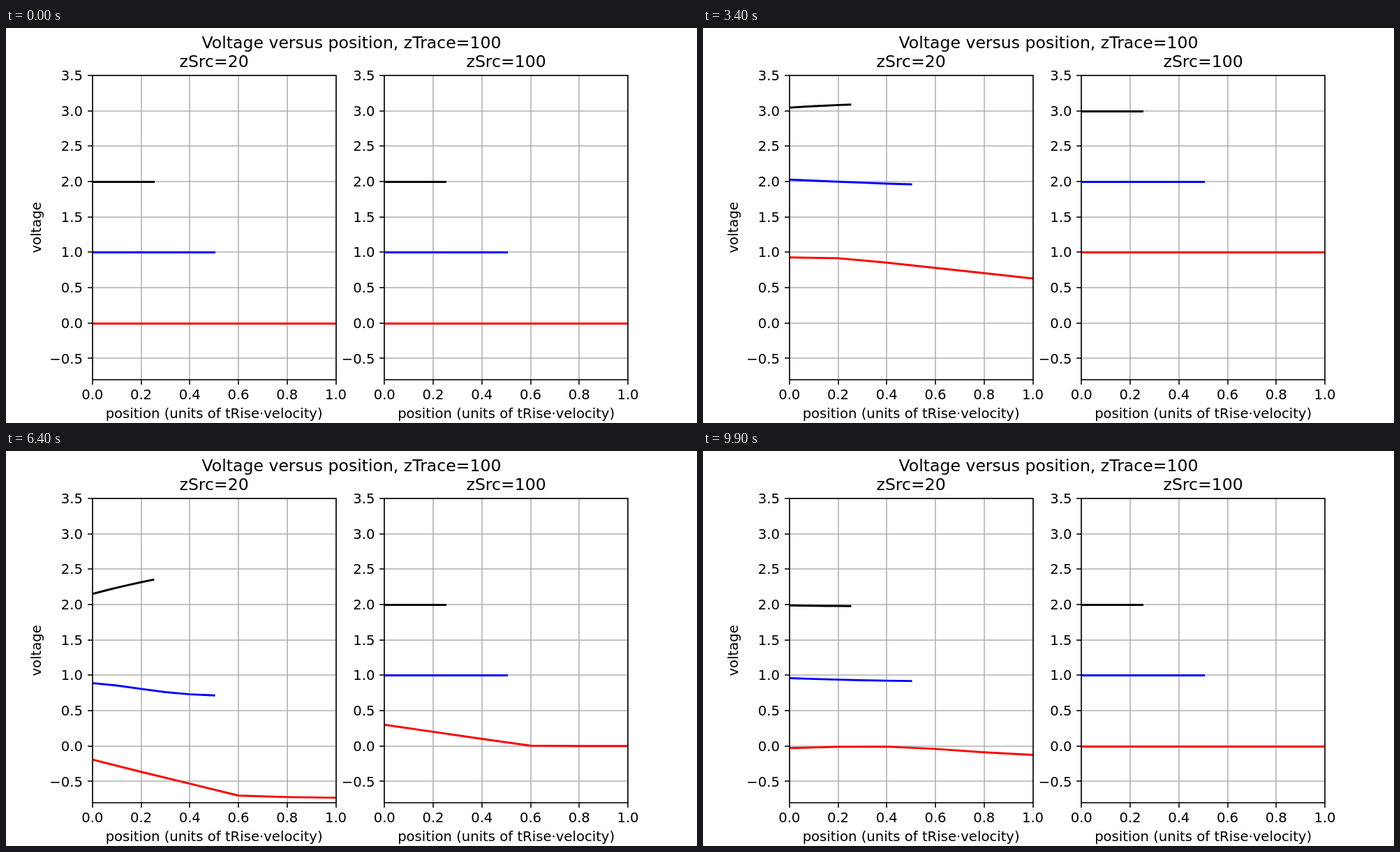
Animation of 990x566 px, one loop 10 s. Source, as an HTML page with a canvas:

```html
<!DOCTYPE html>
<html lang="en">
<head>
<meta charset="utf-8">
<title>Voltage versus position</title>
<style>
html, body { margin: 0; width: 100%; height: 100%; overflow: hidden; background: #fff; }
canvas { display: block; }
</style>
</head>
<body>
<canvas id="stage" width="990" height="566"></canvas>
<script>
const ctx = document.getElementById('stage').getContext('2d');
const PT = 990 / 7 / 72;
const W = 348.75, H = 435.82, TOP = 67.92, BOTTOM = TOP + H;
const SMALL = 10 * PT, LARGE = 12 * PT, TICK = 3.5 * PT;
const Z_TRACE = 100, LEAD = 0.2, STEP = 0.2, PULSE = 10;
const panels = [{ left: 123.75, zSrc: 20 }, { left: 542.25, zSrc: 100 }];
const traces = [
  { len: 1, offset: 0, color: '#f00', spread: 0.02 },
  { len: 0.5, offset: 1, color: '#00f', spread: 0.055 },
  { len: 0.25, offset: 2, color: '#000', spread: 0.08 }
];

const yOf = v => TOP + (3.5 - v) * H / 4.3;
const snap = v => Math.floor(v + 0.5);

// Unit ramp averaged over a window of half width w.
function ramp(u, w) {
  const q = a => a > 0 ? a * a / 2 : 0;
  return (q(u + w) - q(u - w) - q(u - 1 + w) + q(u - 1 - w)) / (2 * w);
}

// Sum of all bounces on a line with an open far end and a short lead at both ends.
function voltage(x, t, { len, spread }, zSrc) {
  const gain = Z_TRACE / (Z_TRACE + zSrc);
  const reflect = (zSrc - Z_TRACE) / (zSrc + Z_TRACE);
  const trip = 2 * (len + 2 * LEAD);
  const back = trip - 2 * LEAD - x;
  const wave = delay => {
    const w = Math.max(0.001, spread * delay);
    return ramp(t - delay, w) - ramp(t - PULSE - delay, w);
  };
  let sum = 0, weight = gain;
  for (let d = 0; d < t + 2 && weight; d += trip, weight *= reflect)
    sum += weight * (wave(d + x) + wave(d + back));
  return sum;
}

function line(x1, y1, x2, y2) {
  ctx.beginPath();
  ctx.moveTo(x1, y1);
  ctx.lineTo(x2, y2);
  ctx.stroke();
}

function label(text, x, y, size = SMALL, align = 'center') {
  ctx.font = `${size}px "DejaVu Sans", sans-serif`;
  ctx.textAlign = align;
  ctx.fillText(text, x, y);
}

function drawTrace(trace, { left, zSrc }, t) {
  let pts = [0, 1, 2, 3, 4, 5].map(i => {
    const x = trace.len * i / 5;
    return [left + x * W, yOf(trace.offset + voltage(x, t, trace, zSrc))];
  });
  // Flat lines sit on whole pixels.
  if (pts.every(p => Math.abs(p[1] - pts[0][1]) < 0.05))
    pts = pts.map(p => p.map(v => snap(v) + 0.5));
  ctx.strokeStyle = trace.color;
  ctx.beginPath();
  pts.forEach(p => ctx.lineTo(...p));
  ctx.stroke();
}

function drawPanel(panel, t) {
  const { left, zSrc } = panel;
  const x0 = snap(left), x1 = snap(left + W), y0 = snap(TOP), y1 = snap(BOTTOM);
  const xTicks = [0, 0.2, 0.4, 0.6, 0.8, 1];
  const yTicks = [-0.5, 0, 0.5, 1, 1.5, 2, 2.5, 3, 3.5];

  ctx.lineWidth = 0.8 * PT;
  ctx.lineCap = 'butt';
  for (const v of xTicks) {
    const x = snap(left + v * W);
    ctx.strokeStyle = '#b0b0b0';
    line(x, y0, x, y1);
    ctx.strokeStyle = '#000';
    line(x, y1, x, y1 + TICK);
    label(v.toFixed(1), left + v * W, BOTTOM + 2 * TICK + 0.76 * SMALL);
  }
  for (const v of yTicks) {
    const y = snap(yOf(v));
    ctx.strokeStyle = '#b0b0b0';
    line(x0, y, x1, y);
    ctx.strokeStyle = '#000';
    line(x0 - TICK, y, x0, y);
    label(v.toFixed(1).replace('-', '\u2212'), left - 2 * TICK, yOf(v) + 0.365 * SMALL, SMALL, 'right');
  }

  ctx.save();
  ctx.beginPath();
  ctx.rect(x0, y0, x1 - x0, y1 - y0);
  ctx.clip();
  ctx.lineWidth = 1.5 * PT;
  ctx.lineCap = 'square';
  ctx.lineJoin = 'round';
  for (const trace of traces) drawTrace(trace, panel, t);
  ctx.restore();

  ctx.strokeStyle = '#000';
  ctx.strokeRect(x0, y0, x1 - x0, y1 - y0);
  label(`zSrc=${zSrc}`, left + W / 2, TOP - 6 * PT, LARGE);
  label('position (units of tRise\u22c5velocity)', left + W / 2, 559.2);
}

function draw(now) {
  const frame = Math.floor(now / 100) % 100;
  ctx.fillStyle = '#fff';
  ctx.fillRect(0, 0, 990, 566);
  ctx.fillStyle = '#000';
  for (const panel of panels) drawPanel(panel, frame * STEP);
  label('Voltage versus position, zTrace=100', 495, 29.2, LARGE);
  ctx.save();
  ctx.translate(50, TOP + H / 2);
  ctx.rotate(-Math.PI / 2);
  label('voltage', 0, 0);
  ctx.restore();
}

const start = performance.now();
function tick() {
  draw(performance.now() - start);
  requestAnimationFrame(tick);
}
tick();
</script>
</body>
</html>
```
